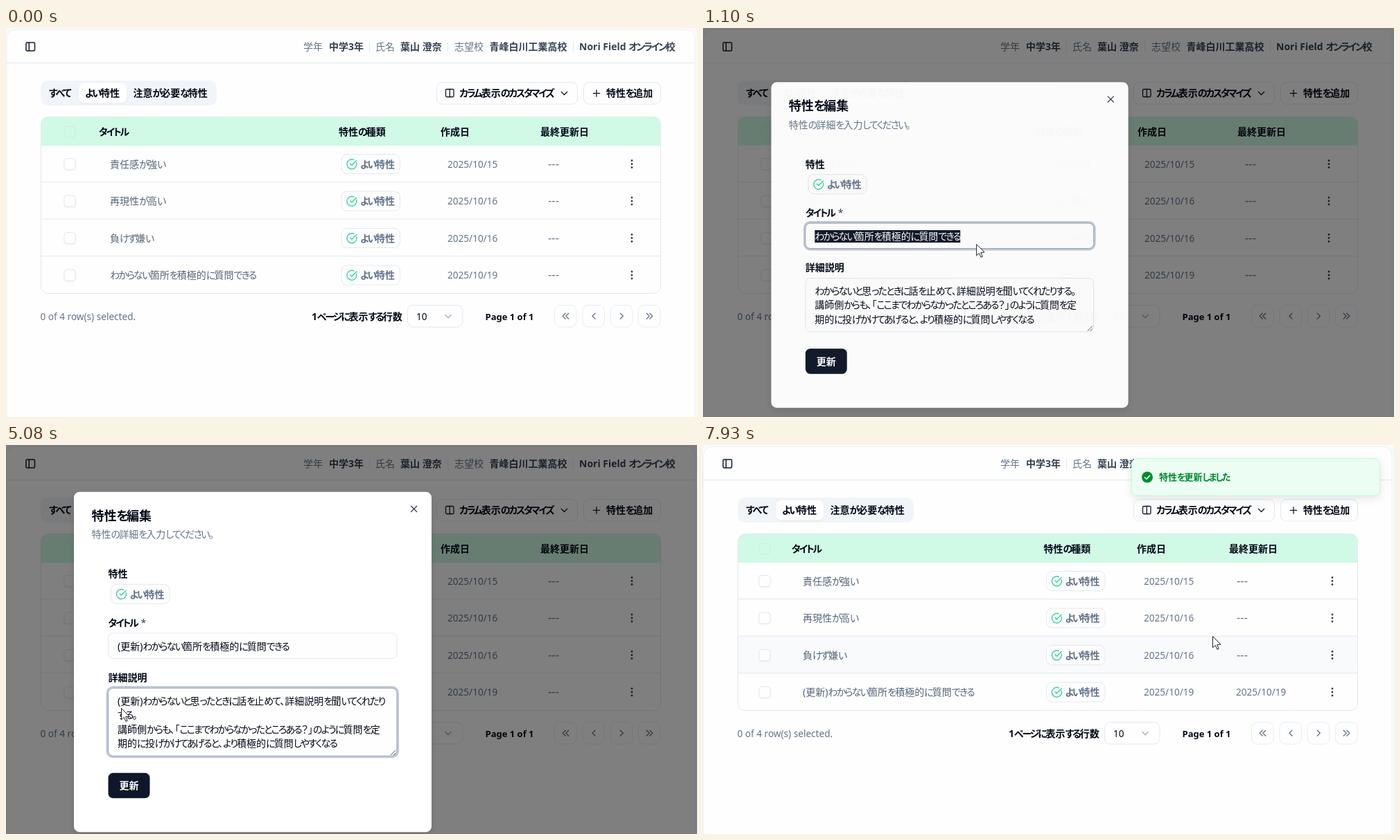
These frames come from a looping animation (997 by 562 pixels, 8000 ms). An HTML page:

```html
<!DOCTYPE html>
<html lang="ja">
<head>
<meta charset="utf-8">
<title>特性一覧</title>
<style>
html, body { margin: 0; height: 100%; overflow: hidden; background: #f8fafc; }
svg { display: block; width: 100vw; height: 100vh; }
text {
  font: 14px "Noto Sans", "Noto Sans CJK JP", sans-serif;
  font-feature-settings: "palt"; fill: #020817; white-space: pre;
}
.k { letter-spacing: -.13em; }
.b { font-weight: 600; }
.b .k { letter-spacing: -.155em; }
.m { fill: #64748b; }
.c { fill: #56657a; }
.h { fill: #334155; }
.e { font-size: 13.6px; }
.b.e { font-size: 13px; }
.mid { text-anchor: middle; }
.box { fill: #fefefe; stroke: #e2e8f0; }
.ic { fill: none; stroke: #0f172a; stroke-width: 1.3; stroke-linecap: round; stroke-linejoin: round; }
.gr { stroke: #64748b; }
.ok { stroke: #34d399; stroke-width: 1.4; }
.ring { fill: none; stroke: #c0c9d6; stroke-width: 3; }
.soft { filter: drop-shadow(0 1px 1px rgba(0,0,0,.06)); }
.deep { filter: drop-shadow(0 4px 6px rgba(0,0,0,.1)); }
</style>
</head>
<body>
<svg id="stage" viewBox="0 0 997 562"></svg>
<script>
const kana = s => s.replace(/[ぁ-ヿ]+/g, '<tspan class="k">$&</tspan>');
const T = (x, y, s, cls = '', attr = '') => `<text x="${x}" y="${y}" class="${cls}" ${attr}>${kana(s)}</text>`;
const R = (x, y, w, h, r, attr = 'class="box"') => `<rect x="${x}" y="${y}" width="${w}" height="${h}" rx="${r}" ${attr}/>`;
const P = (d, cls = '', attr = '') => `<path d="${d}" class="ic ${cls}" ${attr}/>`;
const G = (id, body, attr = '') => `<g id="${id}" ${attr}>${body}</g>`;

const badge = (x, y) => R(x, y, 84.5, 28, 8) +
  P(`M${x + 21.6} ${y + 12.2}a7 7 0 1 1 -3.5 -4.2M${x + 12.6} ${y + 13.6}l2.3 2.2l6.8 -6.8`, 'ok') +
  T(x + 27, y + 19.3, 'よい特性', 'b m');

const ROW = 53.5, TOP = 169.5;
const base = 'わからない箇所を積極的に質問できる';
const titles = ['責任感が強い', '再現性が高い', '負けず嫌い', base];
const days = [15, 16, 16, 19];

function table(id, col, last, updated) {
  let s = [['タイトル', col.title], ['特性の種類', col.kind], ['作成日', col.made], ['最終更新日', col.upd]]
    .map(([name, x]) => T(x, 154.5, name, 'b')).join('');
  s += R(col.check - 8, 142, 16, 16, 4, 'fill="none" stroke="#d0ebdf"');
  titles.forEach((title, i) => {
    const y = 196.5 + ROW * i, edited = i == 3 && updated;
    s += R(col.check - 8, y - 8, 16, 16, 4, 'class="box soft"') +
      T(col.title + 16, y + 5, i == 3 ? last : title, 'c') +
      badge(col.kind + 4, y - 14) +
      T(col.made + 10, y + 5.3, '2025/10/' + days[i], 'm e') +
      (edited ? T(col.upd + 10, y + 5.3, updated, 'm e')
              : T(col.upd + 11, y + 5.3, '---', 'm', 'style="font-size:16.5px"')) +
      [-5, 0, 5].map(d => `<circle cx="${col.dots}" cy="${y + d}" r="1.4" fill="#334155"/>`).join('');
  });
  return G(id, s);
}

const pageView =
  R(1, 2.5, 993, 600, 12, 'fill="#fefefe" stroke="#eceff3"') +
  P('M1.5 50.5H993.5', '', 'style="stroke:#e2e8f0;stroke-width:1"') +
  P('M30.5 21h9.5q1.5 0 1.5 1.5v9q0 1.5 -1.5 1.5h-9.5q-1.5 0 -1.5 -1.5v-9q0 -1.5 1.5 -1.5zM33.3 21v12', '', 'style="stroke-width:1.5"') +
  T(429, 32, '学年', 'm') + T(466, 32, '中学3年', 'b h') +
  T(533, 32, '氏名', 'm') + T(569, 32, '葉山 澄奈', 'b h') +
  T(647, 32, '志望校', 'm') + T(697.5, 32, '青峰白川工業高校', 'b h') +
  T(827, 32, 'Nori Field オンライン校', 'b h') +
  P('M524.5 19.5v15M637.5 19.5v15M818.5 19.5v15', '', 'style="stroke:#e2e8f0;stroke-width:1"') +
  // tabs and toolbar
  R(50, 76, 254, 36, 10, 'fill="#f1f5f9"') +
  R(105, 79.5, 69, 29, 8, 'fill="#fff" class="soft"') +
  T(62, 99.3, 'すべて', 'b') + T(114, 99.3, 'よい特性', 'b') + T(183.5, 99.3, '注意が必要な特性', 'b') +
  R(621.5, 78.5, 203, 31.5, 8) + R(634.5, 88.5, 11.5, 11, 1.5, 'class="ic"') + P('M640.25 88.5v11') +
  T(654, 99.3, 'カラム表示のカスタマイズ', 'b') + P('M801.3 92.3l4.2 4.2l4.2 -4.2') +
  R(833.5, 78.5, 111, 31.5, 8) + P('M847.3 94.3h9.4M852 89.6v9.4') + T(866, 99.3, '特性を追加', 'b') +
  // table frame
  R(50.5, 128.5, 894, 255, 10, 'fill="#fefefe"') +
  G('hover', R(50.5, TOP, 894, ROW, 0, 'fill="#f8fafc"')) +
  '<path d="M50.5 170V138.5a10 10 0 0 1 10 -10H934.5a10 10 0 0 1 10 10V170z" fill="#d0fae5"/>' +
  [1, 2, 3].map(i => P(`M50.5 ${TOP + ROW * i - .5}h894`, '', 'style="stroke:#e2e8f0;stroke-width:1"')).join('') +
  R(50.5, 128.5, 894, 255, 10, 'fill="none" stroke="#e2e8f0"') +
  table('before', { check: 92, title: 134, kind: 480, made: 627, upd: 771, dots: 903 }, base) +
  table('after', { check: 89, title: 128, kind: 491.5, made: 626, upd: 759, dots: 908 }, '(更新)' + base, '2025/10/19') +
  // footer
  T(49.5, 422, '0 of 4 row(s) selected.', 'm e') + T(441, 421.5, '1ページに表示する行数', 'b') +
  R(579.5, 400.5, 79.5, 31.5, 8) + T(592, 422, '10', 'e') +
  P('M633.8 414.5l4.2 4.2l4.2 -4.2', '', 'style="stroke:#a3adba"') +
  T(691.5, 422, 'Page 1 of 1', 'b e') +
  [791.5, 832, 872.3, 912.5].map((x, i) => {
    const d = i < 2 ? -1 : 1, cx = x + 16;
    const arrow = o => `M${cx + o - 2 * d} 412.3l${4 * d} 4l${-4 * d} 4`;
    return R(x, 400.5, 31.5, 31.5, 8, 'class="box" opacity=".8"') +
      P(i % 3 ? arrow(0) : arrow(-2.3) + arrow(2.3), 'gr');
  }).join('');

const dialog =
  R(98, 78, 516, 471, 8, 'id="panel" fill="#fff" class="deep"') +
  T(123.5, 118.8, '特性を編集', 'b', 'style="font-size:18px"') +
  T(123.5, 144.3, '特性の詳細を入力してください。', 'm') +
  P('M584.5 98.5l8.2 8.2m0 -8.2l-8.2 8.2', '', 'style="stroke:#334155"') +
  T(147.5, 201.7, '特性', 'b') + badge(151.5, 211.5) +
  T(147.5, 272, 'タイトル', 'b') + T(194.5, 272, '*', 'h') +
  R(146, 280.5, 419.5, 39.5, 8.5, 'id="ringA" class="ring"') + R(147.5, 282, 416.5, 36.5, 7, 'id="boxA" class="box"') +
  R(161, 292, 210, 18, 0, 'id="mark" fill="#0f172a"') +
  T(161, 305.8, base, '', 'id="title"') +
  T(147.5, 351, '詳細説明', 'b') +
  R(146, 360, 419.5, 80.5, 8.5, 'id="ringB" class="ring"') + R(147.5, 361.5, 416.5, 77.5, 7, 'id="boxB" class="box"') +
  [0, 1, 2, 3].map(i => T(161, 385.4 + 20.25 * i, '', '', `id="line${i}"`)).join('') +
  R(0, 0, 1.2, 18, 0, 'id="caret" fill="#020817"') +
  G('low', P('M555.5 437.5l6.5 -6.5M559.5 437.5l2.5 -2.5', '', 'style="stroke:#555;stroke-width:1"') +
    R(147.5, 463.5, 60, 36.5, 7, 'fill="#0f172a"') + T(177.5, 487, '更新', 'b mid', 'style="fill:#fff"'));

const toastView =
  R(618.5, 19.5, 358, 53.5, 8, 'fill="#ecfdf3" stroke="#bffcd9" class="deep"') +
  '<circle cx="641" cy="46.5" r="8" fill="#008a2e"/>' +
  P('M637.5 46.8l2.4 2.4l4.6 -4.8', '', 'style="stroke:#ecfdf3;stroke-width:1.6"') +
  T(658, 51.3, '特性を更新しました', 'b', 'style="font-size:13px;fill:#008a2e"');

const stage = document.getElementById('stage');
stage.innerHTML = pageView + R(0, 0, 997, 562, 0, 'id="shade"') + G('modal', G('inner', dialog)) + G('toast', toastView) +
  G('cursor', '<path d="M.5 .5V16.8L4.3 13.4L6.9 19.3L9.2 18.3L6.7 12.5L12 12.1Z" fill="#fff" stroke="#222" stroke-width="1"/>');
const $ = id => document.getElementById(id);
const set = (id, attrs) => { for (const k in attrs) $(id).setAttribute(k, attrs[k]); };
const show = (id, on) => set(id, { opacity: +on });
const write = (id, s) => { const el = $(id); if (el.textContent != s) el.innerHTML = kana(s); };

const clamp = v => Math.min(1, Math.max(0, v));
// CSS "ease" curve
function ease(p) {
  p = clamp(p);
  let lo = 0, hi = 1, u;
  for (let i = 0; i < 20; i++) {
    u = (lo + hi) / 2;
    3 * u * (1 - u) * .25 + u ** 3 < p ? lo = u : hi = u;
  }
  return .3 * u * (1 - u) ** 2 + 3 * u * u * (1 - u) + u ** 3;
}

// pointer: time, x, y
const track = [
  [70, 901, 362], [210, 901, 362], [630, 906, 443], [890, 906, 443], [962, 835, 402], [1100, 395, 312],
  [1300, 225, 304], [1720, 169, 301], [1790, 167, 302], [3140, 167, 302], [3620, 179, 351], [3910, 168, 357],
  [4280, 166, 380], [5470, 166, 380], [6000, 171, 475], [6400, 171, 475], [6900, 300, 409], [7100, 300, 409],
  [7500, 956, 360], [7860, 784, 343], [7930, 735, 276], [8000, 735, 276]];
function pointer(t) {
  const i = Math.max(1, track.findIndex(k => k[0] > t));
  const [t0, x0, y0] = track[i - 1], [t1, x1, y1] = track[i];
  const p = clamp((t - t0) / (t1 - t0));
  return [x0 + (x1 - x0) * p, y0 + (y1 - y0) * p];
}

const typed = [[0, ''], [2670, '('], [2760, '(こ'], [2850, '(こうし'], [2940, '(こうしん)'], [3140, '(更新)']];
const note = ['わからないと思ったときに話を止めて、詳細説明を聞いてくれたり', 'する。',
  '講師側からも、「ここまでわからなかったところある？」のように質問を定', '期的に投げかけてあげると、より積極的に質問しやすくなる'];
const OPEN = 946, SELECT_END = 2400, SWITCH = 4280, PASTE = 5080, BLUR = 6150, CLOSE = 6232, TOAST = 6314, REFRESH = 6600;

function draw(t) {
  const [x, y] = pointer(t);
  show('cursor', t >= 70);
  set('cursor', { transform: `translate(${x} ${y})` });

  const closing = 1 - clamp((t - CLOSE) / 135);
  const open = Math.min(ease((t - OPEN) / 200), closing);
  const dim = Math.min(ease((t - OPEN) / 150), closing);
  const row = Math.floor((y - TOP + 1) / ROW);
  show('hover', t >= 70 && !open && row >= 0 && row < 4);
  set('hover', { transform: `translate(0 ${row * ROW})` });
  show('before', t < REFRESH);
  show('after', t >= REFRESH);

  const grown = +(t >= PASTE), extra = 20.4 * grown, scale = .95 + .05 * open;
  show('shade', dim * .5);
  set('modal', { opacity: open, transform: `translate(356 313.5) scale(${scale}) translate(-356 -313.5)` });
  set('inner', { transform: `translate(0 ${-extra / 2})` });
  set('panel', { height: 471 + extra });
  set('boxB', { height: 77.5 + extra });
  set('ringB', { height: 80.5 + extra });
  set('low', { transform: `translate(0 ${extra})` });

  const inTitle = t < SWITCH, inNote = !inTitle && t < BLUR, selected = t < SELECT_END;
  for (const [k, on] of [['A', inTitle], ['B', inNote]]) {
    show('ring' + k, on);
    $('box' + k).style.stroke = on ? '#94a3b8' : '';
  }
  const prefix = typed.filter(k => k[0] <= t).pop()[1];
  write('title', prefix + base);
  $('title').style.fill = selected ? '#fff' : '';
  show('mark', selected);
  if (selected) set('mark', { width: $('title').getComputedTextLength() });

  const lines = grown ? ['(更新)' + note[0], ...note.slice(1)] : [note[0] + note[1], note[2], note[3], ''];
  lines.forEach((s, i) => write('line' + i, s));

  show('caret', !selected && t < SWITCH + 530);
  set('caret', inTitle
    ? { x: $('title').getStartPositionOfChar(prefix.length).x - .3, y: 292 }
    : { x: 160.7, y: 371.5 });

  const rise = ease((t - TOAST) / 400);
  set('toast', { opacity: rise, transform: `translate(0 ${-53.5 * (1 - rise)})` });
}

const start = performance.now();
function tick() {
  draw((performance.now() - start) % 8000);
  requestAnimationFrame(tick);
}
tick();
</script>
</body>
</html>
```
